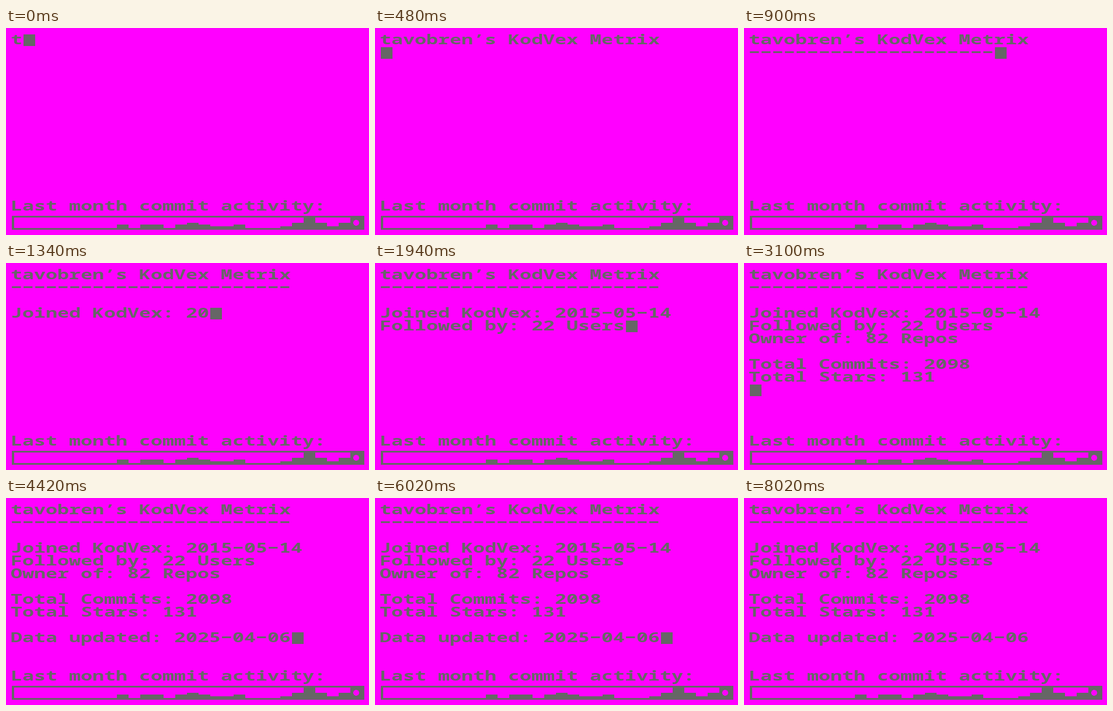
These frames come from a looping animation (622x356 px, 8.42 s). An HTML page:

```html
<!DOCTYPE html>
<html lang="en">
<head>
<meta charset="utf-8">
<style>
  html, body { margin: 0; width: 100%; height: 100%; overflow: hidden; background: #f0f; }
  /* wide terminal face: one 14.4px advance becomes a 20px cell */
  pre {
    position: absolute; left: 8px; margin: 0; color: #666;
    font: 600 24px/22px "Noto Sans Mono", monospace;
    font-variant-ligatures: none;
    transform: scaleX(1.38889); transform-origin: 0 0;
  }
  #log { top: 8px; }
  #label { top: 294px; }
  #cursor { position: absolute; width: 20px; height: 20px; background: #666; }
  svg { position: absolute; left: 0; top: 0; }
</style>
</head>
<body>
<pre id="log"></pre>
<pre id="label">Last month commit activity:</pre>
<div id="cursor"></div>
<svg width="622" height="356" fill="#666" shape-rendering="crispEdges">
  <path d="M10 323H614V347H10ZM14 326V344H610V326Z" fill-rule="evenodd"/>
  <path id="bars"/>
  <circle cx="600" cy="335" r="5" fill="#f0f"/>
</svg>
<script>
const LOOP = 8420, STEP = 20, BLINK = 400, CELL = 20, ROW = 22;
const text = [
  "tavobren’s KodVex Metrix",
  "−".repeat(24),
  "",
  "Joined KodVex: 2015−05−14",
  "Followed by: 22 Users",
  "Owner of: 82 Repos",
  "",
  "Total Commits: 2098",
  "Total Stars: 131",
  "",
  "Data updated: 2025−04−06"
].join("\n");
const typedAt = (text.length - 1) * STEP;

// activity per day, in eighths of the 24px chart
const days = "111111111313313433223111124842148";

const $ = id => document.getElementById(id);
const levels = [...days.slice(0, 0), ...activity()];
$("bars").setAttribute("d", levels.map((n, i) =>
  `M${10 + i * CELL} 347v${-3 * n}h${CELL}v${3 * n}z`).join(""));

function activity() {
  return [1, 1, 1, 1, 1, 1, 1, 1, 1, 3, 1, 3, 3, 1, 3, 4, 3, 2, 2, 3,
    1, 1, 1, 2, 4, 8, 4, 2, 4, 8];
}

function draw(t) {
  const shown = text.slice(0, Math.floor(t / STEP) + 1);
  const lines = shown.split("\n");
  const row = lines.length - 1;
  const style = $("cursor").style;
  $("log").textContent = shown;
  style.left = 10 + lines[row].length * CELL + "px";
  style.top = 11 + row * ROW + "px";
  const off = t > typedAt && Math.floor((t - typedAt - STEP) / BLINK) % 2;
  style.visibility = off ? "hidden" : "visible";
}

const start = performance.now();
function tick() {
  draw((performance.now() - start) % LOOP);
  requestAnimationFrame(tick);
}
tick();
</script>
</body>
</html>
```
